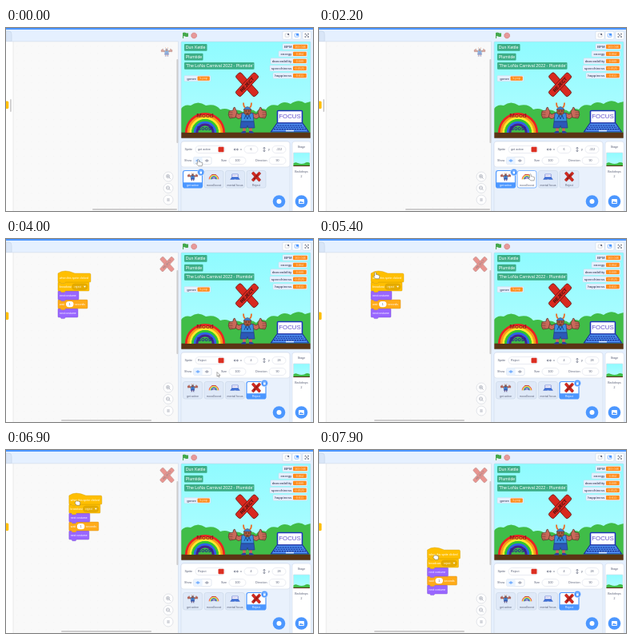
Animation of 384x229 px, one loop 8000 ms. Source, as an HTML page:

```html
<!DOCTYPE html>
<html lang="en">
<head>
<meta charset="utf-8">
<title>Block editor</title>
<style>
  html, body { margin: 0; width: 100%; height: 100%; overflow: hidden; background: #e5f0ff; }
  svg { display: block; width: 100vw; height: 100vh; }
  text { font-family: "Liberation Sans", Arial, sans-serif; }
</style>
</head>
<body>
<svg id="scene" viewBox="0 0 384 229"></svg>
<script>
const LOOP = 8000, SELECT_AT = 3400, GRAB_AT = 6400;
const BLUE = '#4c97ff', INK = '#575e75', EVENT = '#ffbf00', CONTROL = '#ffab19', LOOKS = '#9966ff';
const HILL = '#40bd48', GROUND = '#5a3514', BAR = '#cecdce';
const scene = document.getElementById('scene');

const rect = (x, y, w, h, fill, r = 0, more = '') =>
  `<rect x="${x}" y="${y}" width="${w}" height="${h}" rx="${r}" fill="${fill}" ${more}/>`;
const circle = (x, y, r, fill, more = '') => `<circle cx="${x}" cy="${y}" r="${r}" fill="${fill}" ${more}/>`;
const path = (d, fill, more = '') => `<path d="${d}" fill="${fill}" ${more}/>`;
const line = (d, color, w = 1, more = '') => path(d, 'none', `stroke="${color}" stroke-width="${w}" ${more}`);
const text = (x, y, s, size, fill = INK, more = '') =>
  `<text x="${x}" y="${y}" font-size="${size}" fill="${fill}" ${more}>${s}</text>`;
const group = (inner, more = '') => `<g ${more}>${inner}</g>`;
const use = (id, x, y, scale = 1, more = '') =>
  `<use href="#${id}" transform="translate(${x} ${y}) scale(${scale})" ${more}/>`;
const MID = 'text-anchor="middle"', BOLD = 'font-weight="bold"';

// Sprites, each drawn around its own centre
function rainbow() {
  const bands = ['#ee2222', '#ff9418', '#ffe92c', '#31c62f', '#2f62e8', '#472290'];
  const arcs = bands.map((color, i) => {
    const r = 23.6 - i * 2.7;
    return line(`M${-r} 13A${r} ${r} 0 0 1 ${r} 13`, color, 2.9);
  }).join('');
  return arcs + text(0, -6.5, 'Mood', 8, '#951820', `${MID} ${BOLD}`) +
    text(0, 10, 'Boost', 7, '#26268c', `${MID} ${BOLD}`);
}

function hero() {
  const skin = '#c9695a', dark = '#553329';
  const arm = side => group(
    line('M5 -5L11 -2L15 -5', dark, 5.4, 'stroke-linejoin="round"') +
    line('M5 -5L11 -2L15 -5', skin, 4.2, 'stroke-linejoin="round"') +
    path('M13 -8L16 -14Q18 -14 18 -10L23 -9Q25 -4 22 0L15 -1Z', skin, `stroke="${dark}" stroke-width=".7"`) +
    line('M18.5 -7H23M18.5 -4.5H23.4M18.5 -2H22.5', dark, .5), `transform="scale(${side} 1)"`);
  const horn = side => line('M3 -13.5Q5 -15 5 -19.5', '#e8702c', 1.8, `transform="scale(${side} 1)"`);
  return arm(-1) + arm(1) +
    line('M-4 10V17M4 10V17', skin, 3.6) +
    path('M-8 18.5Q-7 15 -2 16V18.5ZM8 18.5Q7 15 2 16V18.5Z', '#2643a0') +
    path('M-7 -6Q0 -9 7 -6L8 4H-8Z', '#3a8fe0', 'stroke="#203c83" stroke-width=".7"') +
    path('M-8 4H8L9 12H1L0 9L-1 12H-9Z', '#2b58b8', 'stroke="#203c83" stroke-width=".7"') +
    line('M-4 1L-2 -4L0 1L2 -4L4 1', '#214593', 1) +
    horn(-1) + horn(1) +
    path('M-4.5 -11Q0 -16 4.5 -11L4 -6Q0 -2 -4 -6Z', '#a9583f', `stroke="${dark}" stroke-width=".6"`) +
    path('M-4.8 -11Q0 -18 4.8 -11Z', '#3a7fd8', `stroke="${dark}" stroke-width=".5"`) +
    line('M-2.5 -9H-1M1 -9H2.5M-1.5 -5.8H1.5', '#222', .8);
}

function laptop() {
  let keys = '';
  for (let row = 0; row < 3; row++)
    keys += line(`M${-16 - row * 2} ${4 + row * 2.3}H${16 + row * 2}`, '#16298f', 1.1, 'stroke-dasharray="2.4 .8"');
  return rect(-15.5, -14.5, 31, 15.5, '#fff', 1, 'stroke="#1d35bd" stroke-width="1.6"') +
    text(0, -4.8, 'FOCUS', 7.9, '#6450cc', MID) +
    path('M-16 1H16L23.5 12H-23.5Z', '#4d8df0', 'stroke="#1a2f9a" stroke-width="1.2"') + keys +
    rect(-5, 9.8, 10, 1.6, '#cfe4ff');
}

function cross() {
  const bar = angle => rect(-17.5, -4.3, 35, 8.6, '#d8291f', 2.5,
    `transform="rotate(${angle})" stroke="#6b1512" stroke-width=".8"`);
  return bar(48) + bar(-47) +
    text(0, 2, 'REJECT', 5.8, '#3d0d0c', `${MID} ${BOLD} transform="rotate(-47)"`);
}

function stage() {
  const hills = 'M219 131V101Q223 95 231 97Q240 90 250 97Q262 94 268 102Q277 99 283 105' +
    'Q290 100 296 105Q306 99 313 105Q318 99 325 102Q330 94 340 97Q347 90 356 95Q366 88 374 94L381 92V131Z';
  const title = (y, w, s) => rect(223, y, w, 8.8, '#3cae87', 1) + text(224.7, y + 6.4, s, 5.3, '#fff');
  const monitor = (x, y, w, label, value, split) =>
    rect(x, y, w, 7.2, '#e6f0ff', 1, 'stroke="#c8d6e6" stroke-width=".4"') +
    text(split - 1.5, y + 5.1, label, 4.3, INK, `text-anchor="end" ${BOLD}`) +
    rect(split, y + 1, x + w - split - 1.2, 5.2, '#ff8c1a', 1) +
    text((split + x + w - 1.2) / 2, y + 4.9, value, 3.8, '#ffe3c4', MID);
  return rect(219, 17, 162, 121, 'url(#sky)') + path(hills, HILL) + rect(219, 130.7, 162, 7.3, GROUND) +
    use('rainbow', 249, 118) + use('laptop', 355, 118) + use('hero', 302, 113) + use('cross', 301.5, 70.8) +
    title(20, 28.5, 'Dun Kettle') + title(31.7, 23.5, 'Plumtide') +
    title(43, 87.5, "'The LoNa Carnival 2022 - Plumtide'") +
    monitor(223, 59.5, 33, 'genre', 'k-pop', 239.5) +
    monitor(346, 19.7, 32.2, 'BPM', '163.046', 359) +
    monitor(341, 28.8, 36, 'energy', '0.864', 359) +
    monitor(331, 37.7, 46, 'danceability', '0.689', 359) +
    monitor(330, 46.7, 47, 'speechiness', '0.0525', 359) +
    monitor(334, 56, 43, 'happiness', '0.611', 359) +
    rect(219, 17, 162, 121, 'none', 1.5, 'stroke="#c5d4e5" stroke-width=".6"');
}

function workspace() {
  const zoom = (y, mark) => circle(203, y, 6, '#fff', 'stroke="#dadce2" stroke-width=".8"') +
    group(mark(y), 'opacity=".65"');
  const lens = plus => y => circle(202.5, y - .5, 2.1, 'none', `stroke="${INK}" stroke-width=".6"`) +
    line(`M204 ${y + 1}L205.7 ${y + 2.7}M201.3 ${y - .5}h2.4` + (plus ? `M202.5 ${y - 1.7}v2.4` : ''), INK, .6);
  return rect(0, 17, 215.5, 212, '#f9f9f9') + rect(9, 17, 206, 212, 'url(#dots)') +
    rect(0, 17, 9, 212, '#fff') + line('M9 17V229', '#e2e2e2', .7) +
    line('M0 16.8H215.5V229', '#d5dfeb', .7) +
    rect(-6, 91.5, 9.3, 9.5, EVENT, 1.5) + rect(213.4, 39, 2, 105, BAR, 1) +
    zoom(186, lens(true)) + zoom(200.5, lens(false)) +
    zoom(215, y => line(`M201.3 ${y - 1}h3.4M201.3 ${y + 1}h3.4`, INK, .8));
}

function header() {
  const button = (x, w) => rect(x, 4.2, w, 10, '#fff', 1.5, 'stroke="#cbd8e8" stroke-width=".6"');
  return rect(0, 0, 384, 2, BLUE) +
    path('M0 4H4Q7 4 7 8V17H0Z', '#d9e6f8', 'stroke="#c4d3e6" stroke-width=".6"') +
    path('M221 6Q223 4.8 225 6T228 6V10.5Q226 11.5 224 10.5T222 10.5V13H221Z', '#45a84b') +
    path('M233.7 6.2h2.9l1.8 1.8v2.9l-1.8 1.8h-2.9l-1.8 -1.8v-2.9z', '#e69a9a', 'stroke="#d47c7c" stroke-width=".7"') +
    button(346, 11) + button(358, 11) + button(371, 10.5) +
    rect(349.2, 7, 4.8, 4.2, 'none', .5, 'stroke="#a9aebb" stroke-width=".5"') + rect(352.2, 7, 1.8, 1.8, INK) +
    rect(361.2, 7, 4.8, 4.2, 'none', .5, `stroke="${BLUE}" stroke-width=".6"`) + rect(363, 7, 3, 2.6, BLUE) +
    line('M374 8.5V7H375.5M377 7H378.5V8.5M378.5 10V11.5H377M375.5 11.5H374V10M374.2 7.2L378.3 11.3M378.3 7.2L374.2 11.3', INK, .6);
}

function panels() {
  const field = (x, y, w) => rect(x, y - 4.5, w, 9, '#fff', 4.5, 'stroke="#dce0e9" stroke-width=".6"');
  const eye = (x, color) => line(`M${x - 2.4} 166Q${x} 163 ${x + 2.4} 166Q${x} 169 ${x - 2.4} 166Z`, color, .6) +
    circle(x, 166, .9, color);
  const box = 'stroke="#d6deeb" stroke-width=".7"';
  return rect(219, 142, 136, 92, '#e9f1fc', 3, box) + rect(219, 142, 136, 32, '#fff', 3, box) +
    text(223.5, 153.3, 'Sprite', 3.7) + field(237, 152, 37) + rect(265.5, 148.8, 7, 6.5, '#dc2f22', 1) +
    line('M285.5 152H290M286.4 150.8L285 152L286.4 153.2M289.1 150.8L290.5 152L289.1 153.2', INK, .7) +
    text(293, 153.3, 'x', 3.7) + field(298, 152, 17) +
    line('M323 149.7V154.3M321.8 150.7L323 149.2L324.2 150.7M321.8 153.3L323 154.8L324.2 153.3', INK, .7) +
    text(328, 153.3, 'y', 3.7) + field(333, 152, 17) +
    text(223, 167.3, 'Show', 3.7) + rect(234.5, 161.5, 22.5, 9, '#fff', 2, box) +
    rect(234.5, 161.5, 11.2, 9, '#eaf3ff', 2) + eye(240, BLUE) + eye(251.3, '#8b90a1') +
    text(269, 167.3, 'Size', 3.7) + field(279, 166, 21) + text(289.5, 167.3, '100', 3.7, INK, MID) +
    text(312, 167.3, 'Direction', 3.7) + field(329, 166, 21) + text(339.5, 167.3, '90', 3.7, INK, MID) +
    rect(358, 142, 23.5, 92, '#fff', 3, box) + text(369.5, 150, 'Stage', 3.7, INK, MID) +
    rect(359.5, 156, 20.5, 17, 'url(#sky)', .5, box) +
    path('M359.5 172.5V169.5Q362 167.5 365 169Q369 170.5 373 169.5Q377 167 380 169V172.5Z', HILL) +
    rect(359.5, 172, 20.5, 1, GROUND) +
    text(369.5, 181, 'Backdrops', 3.5, INK, MID) + text(369.5, 186.8, '2', 3.5, INK, MID);
}

const tiles = [
  { x: 233.5, name: 'get active', icon: use('hero', 233.5, 186.3, .27) },
  { x: 260, name: 'mood boost', icon: use('rainbow', 260, 186, .25) },
  { x: 286.5, name: 'mental focus', icon: use('laptop', 286.5, 186.5, .25) },
  { x: 313, name: 'Reject', icon: use('cross', 313, 186, .4) }
];

function tileView({ x, name, icon }, selected, hovered) {
  const active = selected || hovered;
  return rect(x - 12, 178.5, 24, 21.5, active ? '#fff' : '#dfe9f8', 2.5,
      `stroke="${active ? BLUE : '#ccd8e8'}" stroke-width="${selected ? 1.2 : .7}"`) + icon +
    (selected ? path(`M${x - 12} 193.3h24v4.7q0 2 -2 2h-20q-2 0 -2 -2z`, BLUE) : '') +
    text(x, 198, name, 3.5, selected ? '#fff' : INK, MID) +
    (selected ? circle(x + 10.3, 180.5, 4.2, BLUE, 'stroke="#cfe2ff" stroke-width=".7"') +
      rect(x + 9, 179.7, 2.6, 2.8, '#fff', .4) + line(`M${x + 8.5} 179h3.6`, '#fff', .6) : '');
}

function script() {
  const block = (y, w, color, edge) => path(
    `M65 ${y + 1}q0 -1 1 -1h2l1.2 1.6h4l1.2 -1.6h${w - 10.4}q1 0 1 1v9q0 1 -1 1h${10.4 - w}l-1.2 1.6h-4l-1.2 -1.6h-2q-1 0 -1 -1z`,
    color, `stroke="${edge}" stroke-width=".4"`);
  const word = (x, y, s) => text(x, y, s, 3.5, '#fff');
  return block(87, 25, LOOKS, '#774dcb') + block(76, 37, CONTROL, '#cf8b17') + block(65, 26, LOOKS, '#774dcb') +
    block(54, 39, EVENT, '#cc9900') +
    path('M65 43Q73 37 86 43H104.5Q106 43 106 44.5V53Q106 54 105 54H74.4L73.2 55.6H69.2L68 54H66Q65 54 65 53Z',
      EVENT, 'stroke="#cc9900" stroke-width=".4"') +
    word(67, 50, 'when this sprite clicked') + word(66.7, 61, 'broadcast') +
    rect(82.5, 56, 19.5, 7.4, '#e6ac00', 3.7, 'stroke="#cc9900" stroke-width=".4"') +
    word(85.5, 61, 'reject') + path('M97 58.8h3l-1.5 2z', '#fff') +
    word(67, 72, 'next costume') + word(67, 83, 'wait') +
    rect(75, 78, 9.5, 7.2, '#fff', 3.6) + text(79.8, 82.8, '1', 3.5, INK, MID) + word(86, 83, 'seconds') +
    word(67, 94, 'next costume');
}

function addButtons() {
  return circle(341.5, 217, 7.8, BLUE) + circle(341.5, 217, 3, '#fff') + circle(369.5, 217, 7.8, BLUE) +
    rect(366, 214, 7, 6, '#fff', 1) + path('M366.8 219l2 -2.4l1.4 1.4l1 -.8l1.2 1.8z', BLUE);
}

const OUTLINE = 'stroke="#555" stroke-width=".5"';
scene.innerHTML = `<defs>
  <linearGradient id="sky" x2="0" y2="1"><stop stop-color="#8ffbff"/><stop offset="1" stop-color="#b4fdff"/></linearGradient>
  <pattern id="dots" width="9.2" height="9.2" patternUnits="userSpaceOnUse">${rect(4, 4, .8, .8, '#eeeeee')}</pattern>
  ${Object.entries({ rainbow, hero, laptop, cross }).map(([id, draw]) => group(draw(), `id="${id}"`)).join('')}
  </defs>` +
  rect(0, 0, 384, 229, '#e5f0ff') + header() + workspace() + stage() + panels() +
  group('', 'id="selection"') + addButtons() + group(script(), 'id="script"') +
  group(
    path('M0 0V5.6L1.3 4.4L2.3 6.4L3.2 5.9L2.3 4H4Z', '#fff', `id="arrow" ${OUTLINE}`) +
    path('M-.9 .8Q0 -.6 .9 .8V3Q2 2.4 2.5 3.4Q3.6 2.8 4 3.9Q5.4 3.6 5.3 5L4.7 8.2H.3L-2.6 5Q-2.4 3.8 -.9 5Z',
      '#fff', `id="hand" ${OUTLINE}`) +
    path('M-1.2 3Q0 1.4 1 2.6Q2 1.8 2.7 2.9Q4.6 2.7 4.5 4.4L4 7.7H0L-2.2 4.8Z',
      '#fff', `id="fist" ${OUTLINE}`), 'id="pointer"');

const part = Object.fromEntries(['selection', 'script', 'pointer', 'arrow', 'hand', 'fist']
  .map(id => [id, document.getElementById(id)]));

const route = [
  [0, 240.5, 164.5], [200, 240.5, 164.5], [800, 150, 102.5], [1500, 150, 102.5], [2100, 264, 182.5],
  [2400, 265, 183], [3100, 312, 185], [3600, 312, 185], [4000, 264, 166.5], [4300, 250, 160],
  [5100, 72, 44], [5400, 70.5, 41.5], [5800, 74.5, 47.5], [GRAB_AT, 74.5, 47.5], [6900, 88.3, 61.5],
  [7200, 103, 80], [7700, 145, 129.5], [LOOP, 145, 129.5]
];

function pointerAt(t) {
  const i = Math.max(1, route.findIndex(stop => stop[0] > t));
  const [t0, x0, y0] = route[i - 1], [t1, x1, y1] = route[i];
  const k = (t - t0) / (t1 - t0);
  return [x0 + (x1 - x0) * k, y0 + (y1 - y0) * k];
}

function selectionView(chosen, hovered) {
  const reject = chosen === 3;
  const values = reject ? ['Reject', '4', '28'] : ['get active', '6', '-152'];
  return text(240, 153.3, values[0], 3.7) + text(306.5, 153.3, values[1], 3.7, INK, MID) +
    text(341.5, 153.3, values[2], 3.7, INK, MID) +
    (reject ? use('cross', 201.5, 31.5, .62, 'opacity=".48"') : use('hero', 201, 30, .3, 'opacity=".55"')) +
    rect(reject ? 69 : 108, 226, reject ? 113 : 106, 2, BAR, 1) +
    (reject ? '' : rect(5, 89, 1.8, 16, BAR, .9)) +
    tiles.map((tile, i) => tileView(tile, i === chosen, i === hovered)).join('');
}

let shown = '';
function draw(t) {
  const [x, y] = pointerAt(t);
  const chosen = t < SELECT_AT ? 0 : 3, grabbed = t >= GRAB_AT;
  const hovered = tiles.findIndex(tile => Math.abs(x - tile.x) < 12 && y > 178 && y < 200);
  const overBlocks = chosen === 3 && x > 65 && x < 106 && y > 39 && y < 98;
  const overEyes = x > 234 && x < 257 && y > 161 && y < 171;
  const shape = grabbed ? 'fist' : hovered >= 0 || overBlocks || overEyes ? 'hand' : 'arrow';

  const state = `${chosen},${hovered}`;
  if (state !== shown) {
    part.selection.innerHTML = selectionView(chosen, hovered);
    shown = state;
  }
  part.script.style.display = chosen === 3 ? '' : 'none';
  const [gx, gy] = grabbed ? pointerAt(GRAB_AT) : [x, y];
  part.script.setAttribute('transform', `translate(${x - gx} ${y - gy})`);
  part.pointer.setAttribute('transform', `translate(${x} ${y})`);
  for (const id of ['arrow', 'hand', 'fist']) part[id].style.display = id === shape ? '' : 'none';
}

const start = performance.now();
function tick() {
  draw((performance.now() - start) % LOOP);
  requestAnimationFrame(tick);
}
tick();
</script>
</body>
</html>
```
